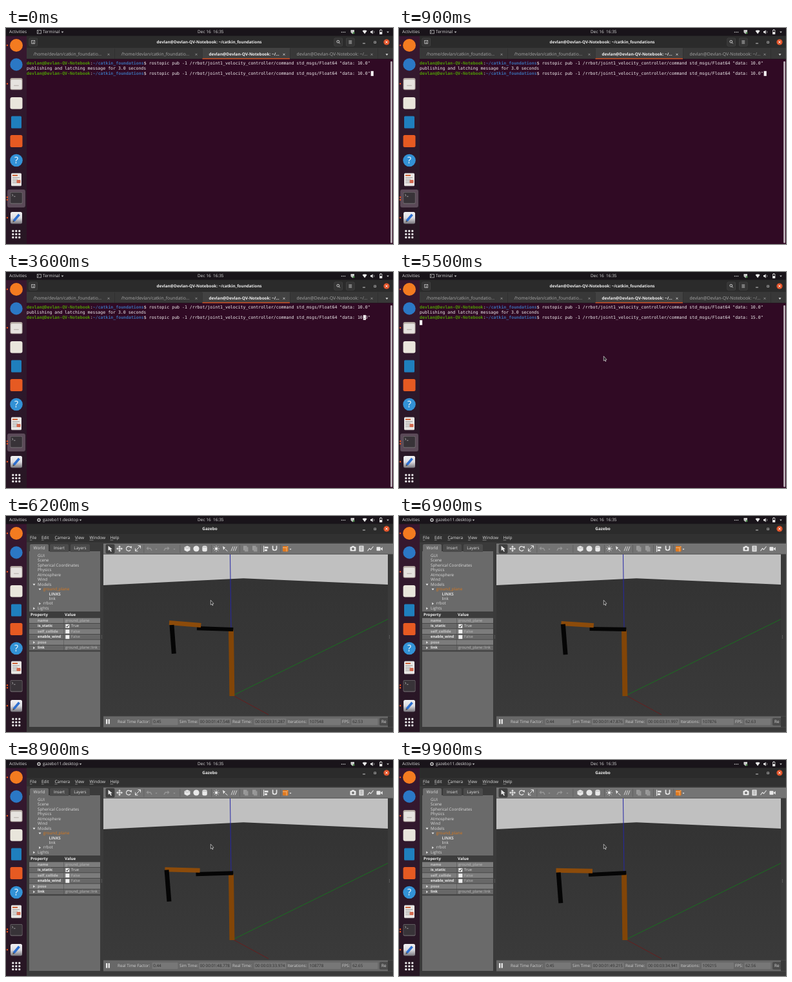
Write an HTML page with a canvas that moves like this. It is 600 px wide and 337 px high and loops after 10 s.

```html
<!DOCTYPE html>
<html lang="en">
<head>
<meta charset="utf-8">
<title>Robot arm velocity command</title>
<style>
html, body { margin: 0; width: 100%; height: 100%; overflow: hidden; background: #000; }
canvas { display: block; }
</style>
</head>
<body>
<canvas id="stage" width="600" height="337"></canvas>
<script>
const c = document.getElementById('stage').getContext('2d');
const UI = '"Open Sans", "Noto Sans", sans-serif';
const MONO = '"DejaVu Sans Mono", monospace';
const CELL = 3.953, LEFT = 32, LINE = 7.95;
const USER = 'devlan', HOST = 'Devlan-QV-Notebook', DIR = '~/catkin_foundations';
c.textRendering = 'geometricPrecision';
c.textBaseline = 'middle';

// ---- drawing helpers ----
function rect(x, y, w, h, fill, r = 0) {
  c.fillStyle = fill;
  c.beginPath();
  c.roundRect(x, y, w, h, r);
  c.fill();
}
function disc(x, y, r, fill) {
  c.fillStyle = fill;
  c.beginPath();
  c.arc(x, y, r, 0, 7);
  c.fill();
}
function ring(x, y, r, color, w = .8, from = 0, to = 6.3) {
  c.strokeStyle = color;
  c.lineWidth = w;
  c.beginPath();
  c.arc(x, y, r, from, to);
  c.stroke();
}
function trace(p) {
  c.beginPath();
  for (let i = 0; i < p.length; i += 2) c.lineTo(p[i], p[i + 1]);
}
function poly(p, fill) {
  trace(p);
  c.fillStyle = fill;
  c.fill();
}
function line(p, color, w = .8) {
  trace(p);
  c.strokeStyle = color;
  c.lineWidth = w;
  c.stroke();
}
function shade(y0, y1, ...colors) {
  const g = c.createLinearGradient(0, y0, 0, y1);
  colors.forEach((color, i) => g.addColorStop(i / (colors.length - 1), color));
  return g;
}
function text(s, x, y, color = '#ddd', size = 6.4, bold = false, align = 'left') {
  c.font = `${bold ? 'bold ' : ''}${size}px ${UI}`;
  c.textAlign = align;
  c.fillStyle = color;
  c.fillText(s, x, y);
}
function arrow(x, y, s, color, right = false) {
  poly(right ? [x - s * .6, y - s, x + s * .7, y, x - s * .6, y + s]
             : [x - s, y - s * .6, x + s, y - s * .6, x, y + s * .7], color);
}

// ---- desktop ----
function topBar(app, gear) {
  rect(0, 0, 600, 12.3, '#19141a');
  text('Activities', 5, 6.3, '#ddd', 6.6);
  if (gear) {
    ring(51, 6.2, 2, '#ccc', 1.4);
  } else {
    c.strokeStyle = '#ccc';
    c.lineWidth = .7;
    c.strokeRect(48.3, 3.4, 6, 5.4);
    line([49.6, 4.8, 51, 6, 49.6, 7.2], '#ccc', .7);
  }
  text(app, 57, 6.3, '#ddd', 6.5);
  arrow(gear ? 115.5 : 87.5, 6.5, 1.8, '#ccc');
  text('Dec 16  16:35', 297, 6.3, '#ddd', 6.5);
  for (const x of [520.5, 523, 525.5]) disc(x, 6.5, .8, '#ccc');
  poly([534.5, 3, 540, 3, 540, 6.5, 537.3, 9.6, 534.5, 6.5], '#ccc');
  disc(539, 7.8, 1.5, '#4c8b4c');
  poly([552.6, 4.6, 554.3, 3.5, 558, 3.5, 559.6, 4.6, 556.1, 9.3], '#eee');
  poly([565, 5, 566.5, 5, 568.6, 3.2, 568.6, 9.4, 566.5, 7.6, 565, 7.6], '#eee');
  ring(568.6, 6.3, 2.2, '#bbb', .7, -1, 1);
  c.strokeStyle = '#ddd';
  c.lineWidth = .7;
  c.strokeRect(579.4, 3.3, 3.6, 6.2);
  rect(579.4, 6.2, 3.6, 3.3, '#eee');
  rect(580.3, 2.2, 1.8, 1, '#eee');
  arrow(592, 6.5, 1.8, '#ccc');
}

function dock(active) {
  rect(0, 12.3, 32, 325, shade(12, 337, '#38182f', '#2d182b', '#271623'));
  if (active) rect(2, 252, 28, 28, '#5b4a58', 3);

  disc(16, 27, 10, '#f47b20');
  disc(16, 57, 9.7, '#2b78c5');
  rect(6.5, 78, 19, 18.5, '#b3a9a2', 2.5);
  rect(7.5, 80.5, 17, 15, '#e6e3df', 2);
  rect(12, 89, 8, 1.5, '#c2bdb8', .8);
  rect(6.5, 108, 19, 18.5, '#e9e6dc', 3);
  rect(8, 137.5, 16, 19, '#1f7fbd', 1.5);
  rect(6.5, 167, 19, 19, '#e65a22', 2.5);
  disc(16, 206.5, 9.8, '#3392d6');
  text('?', 16, 207, '#fff', 14, false, 'center');

  rect(8, 226.5, 16, 20, '#e8e6e4', 1.5);
  rect(10, 229, 8, 2, '#d0653a');
  for (let i = 0; i < 4; i++) rect(10, 233 + i * 2.6, i % 2 ? 8 : 11, .9, '#999');
  rect(16.5, 237, 6, 5, '#d2684e', 1);

  rect(6.5, 256, 19, 18.5, '#6d686b', 2);
  rect(7.2, 256.7, 17.6, 16.6, '#383338', 1.5);
  line([9.3, 259.3, 11, 260.8, 9.3, 262.3], '#ccc', .7);
  line([12, 262.8, 14.5, 262.8], '#ccc', .7);

  rect(7, 287, 18, 18.5, shade(287, 305.5, '#f2f2f4', '#dcdce0', '#77757c'), 2.5);
  line([12, 301, 20.5, 291], '#2d6fd0', 3.6);
  line([11, 302.4, 12.4, 300.7], '#444', 1.8);

  for (let i = 0; i < 9; i++)
    rect(9.3 + i % 3 * 5, 315.3 + (i / 3 | 0) * 5, 3, 3, '#eee', .8);
  for (const y of [27, 87, 264, 268, 296]) disc(2, y, 1.2, '#e95420');
}

function windowButtons(y) {
  line([553, y + 2, 557, y + 2], '#ddd', .9);
  c.strokeStyle = '#bbb';
  c.lineWidth = .8;
  c.strokeRect(570.8, y - 1, 2.7, 2.7);
  disc(590, y, 4.6, '#e2552b');
  line([588.3, y - 1.7, 591.7, y + 1.7], '#fff', .9);
  line([591.7, y - 1.7, 588.3, y + 1.7], '#fff', .9);
}

function pointer() {
  const p = [317.3, 131.3, 317.3, 138.6, 318.9, 137.2, 320, 139.6, 321, 139.1,
             320, 136.9, 322, 136.7, 317.3, 131.3];
  poly(p, '#222');
  line(p, '#ddd', .7);
}

// ---- terminal ----
function mono(s, col, row, color = '#f2f0f1', bold = false) {
  c.font = `${bold ? 'bold ' : ''}${CELL / .602}px ${MONO}`;
  c.textAlign = 'left';
  c.fillStyle = color;
  c.fillText(s, LEFT + col * CELL, 55.7 + row * LINE);
}
function command(row, value) {
  const who = `${USER}@${HOST}`, path = who.length + 1, end = path + DIR.length;
  mono(who, 0, row, '#4e9a06', true);
  mono(':', who.length, row);
  mono(DIR, path, row, '#3a6db0', true);
  mono(`$ rostopic pub -1 /rrbot/joint1_velocity_controller/command std_msgs/Float64 "data: ${value}"`, end, row);
}
function caret(col, row, under = '') {
  rect(LEFT + col * CELL, 51.3 + row * LINE, CELL + .2, LINE - .3, '#f5f3f4');
  mono(under, col, row, '#300a24');
}

function terminal(ms) {
  rect(32, 12, 568, 20, '#2b2b2b');
  rect(32, 31, 568, 17.5, '#383838');
  rect(304, 31, 136, 17.5, '#424242');
  text(`${USER}@${HOST}: ${DIR}`, 315, 22, '#eee', 6.3, true, 'center');
  for (const x of [35.5, 508.5, 527]) {
    rect(x, 15.5, 13.5, 13, '#484848', 2);
    rect(x + .6, 16.1, 12.3, 11.8, '#353535', 1.5);
  }
  c.strokeStyle = '#ddd';
  c.lineWidth = .7;
  c.strokeRect(39.7, 19.5, 5, 4.8);
  line([42.2, 20.8, 42.2, 24.3], '#ddd', .8);
  ring(514.8, 21.2, 1.9, '#ddd', .9);
  line([516.1, 22.6, 517.8, 24.4], '#ddd', 1);
  for (const y of [20, 22, 24]) line([531.4, y, 536.2, y], '#ddd', .8);
  windowButtons(22);

  const session = `${USER}@${HOST}: ~/…`, path = `/home/${USER}/catkin_foundatio…`;
  [path, path, session, session].forEach((label, i) => {
    const x = 32 + i * 136, on = i === 2, color = on ? '#f2f2f2' : '#a6a6a6';
    text(label, x + 10.5, 41.3, color, on ? 6.4 : 6.85, on);
    line([x + 125.5, 39.8, x + 128.5, 42.8], color, .7);
    line([x + 128.5, 39.8, x + 125.5, 42.8], color, .7);
    rect(x + 136, 32, .5, 16, '#282828');
  });
  arrow(590.5, 41.5, 2, '#ddd');

  rect(32, 48.5, 568, 289, '#300a24');
  rect(304.5, 47.2, 135.5, 1.4, '#e95420');
  rect(596.2, 52, 2.6, 283.5, '#c9c1c6', 1);
  command(0, '10.0');
  mono('publishing and latching message for 3.0 seconds', 0, 1);

  command(2, ms < 4300 ? '10.0' : ms < 4600 ? '1.0' : '15.0');
  if (ms < 1800) caret(135, 2);
  else if (ms < 2000) caret(134, 2, '"');
  else if (ms < 2200) caret(133, 2, '0');
  else if (ms < 4300) caret(132, 2, '.');
  else if (ms < 4600) caret(131, 2, '.');
  else if (ms < 5100) caret(132, 2, '.');
  else caret(0, 3);
  if (ms >= 5500) pointer();
}

// ---- simulator ----
// Blends values keyed at 6200, 7800 and 9900 ms.
function keyed(ms, a, b, d) {
  return ms < 7800 ? a + (b - a) * (ms - 6200) / 1600 : b + (d - b) * (ms - 7800) / 2100;
}
function clock(ms) {
  const n = (v, w = 2) => String(Math.floor(v)).padStart(w, '0');
  return `00 00:${n(ms / 60000)}:${n(ms / 1000 % 60)}.${n(ms % 1000, 3)}`;
}

function sidePanel() {
  rect(36, 55, 110, 274, '#6a6a6a');
  [['World', 37, 29], ['Insert', 68, 29], ['Layers', 100, 30]].forEach(([s, x, w], i) => {
    rect(x, 44, w, 12, i ? '#4b4b4b' : '#6a6a6a', [2, 2, 0, 0]);
    text(s, x + w / 2, 50, '#ddd', 6.4, false, 'center');
  });
  const tree = ['GUI', 'Scene', 'Spherical Coordinates', 'Physics', 'Atmosphere', 'Wind',
                'Models', ' ground_plane', '  LINKS', '  link', ' rrbot', 'Lights'];
  tree.forEach((s, i) => {
    const name = s.trim(), depth = s.length - name.length, y = 62.3 + i * 7.45;
    text(name, 49 + depth * 8.7, y, i === 7 ? '#d9781c' : '#dcdcdc', 6.3, i === 8);
    if (i === 6 || i === 7 || i > 9) arrow(43.5 + depth * 9, y, 2, '#eee', i > 9);
  });

  rect(36, 149, 110, 62.5, '#3c3c3c');
  text('Property', 38, 154.7, '#eee', 6.2, true);
  text('Value', 91, 154.7, '#eee', 6.2, true);
  const rows = [['name', 'ground_plane'], ['is_static', 'True'], ['self_collide', 'False'],
                ['enable_wind', 'False'], ['pose', ''], ['link', 'ground_plane::link']];
  rows.forEach(([key, value], i) => {
    const y = 159.3 + i * 8.5, mid = y + 4, box = i > 0 && i < 4;
    rect(36, y, 110, 7.8, i % 2 ? '#686868' : '#7c7c7c');
    rect(89.5, y, .5, 7.8, '#4a4a4a');
    text(key, 49, mid, i % 2 ? '#eee' : '#c8c8c8', 5.8, true);
    text(value, box ? 101 : 92, mid, i === 1 ? '#ddd' : '#bcbcbc', 5.8);
    if (i > 3) arrow(43.5, mid, 2, '#eee', true);
    if (box) rect(92.3, y + .9, 6, 6, '#f0f0f0', .5);
    if (i === 1) line([93.3, mid, 94.8, mid + 1.6, 97.3, mid - 2], '#222', 1);
  });
}

function toolbar() {
  const w = '#e8e8e8', dim = '#969696';
  rect(151, 43, 449, 16.5, '#747474');
  rect(154.5, 44, 14, 14.5, '#404040', 2);
  poly([158.5, 46.5, 158.5, 54, 160.5, 52.6, 162.5, 55.8, 164, 55, 162.2, 52, 164.8, 51.8], w);
  line([172, 51, 180, 51], w, 1.2);
  line([176, 47, 176, 55], w, 1.2);
  for (const d of [-1, 1]) {
    poly([176 + d * 5, 51, 176 + d * 2.6, 49, 176 + d * 2.6, 53], w);
    poly([176, 51 + d * 5, 174, 51 + d * 2.6, 178, 51 + d * 2.6], w);
  }
  ring(190, 51, 3.5, w, 1.2, .5, 5.6);
  poly([191.5, 48, 195, 47, 194.5, 51], w);
  line([201, 54, 208, 47], w, 1);
  line([204.5, 46.5, 208.5, 46.5, 208.5, 50.5], w, 1);
  line([200.5, 50.5, 200.5, 54.8, 204.5, 54.8], w, 1);
  for (const x of [213.5, 269.5, 318, 362, 394, 425.5]) rect(x, 45, .7, 12.5, '#5a5a5a');

  for (const [x, d] of [[222, -1], [249, 1]]) {
    line([x - d * 4, 54, x - d * 2, 50.5, x + d * 2, 50.5], dim, 1.5);
    poly([x + d * 4.5, 50.5, x + d * 1.5, 47.5, x + d * 1.5, 53.5], dim);
  }
  for (const x of [233, 261]) arrow(x, 52, 1.5, dim);
  poly([276.5, 48.5, 281, 46.5, 285.5, 48.5, 285.5, 53.5, 281, 55.8, 276.5, 53.5], w);
  line([276.5, 48.5, 281, 50.5, 285.5, 48.5], '#999', .6);
  disc(295, 51, 4.6, w);
  rect(304.3, 46.5, 7.5, 9, w, 2.5);
  line([304.5, 48.7, 311.6, 48.7], '#999', .6);
  for (let i = 0; i < 8; i++) {
    const a = i * Math.PI / 4, x = Math.cos(a), y = Math.sin(a);
    line([326 + x * 3, 51 + y * 3, 326 + x * 4.8, 51 + y * 4.8], w, .8);
  }
  disc(326, 51, 2.2, w);
  poly([336, 47, 340, 49.5, 337, 53], w);
  line([340, 52, 343.5, 55], w, 1);
  for (let i = 0; i < 3; i++) line([349 + i * 3, 54.5, 352 + i * 3, 47.5], w, .9);
  for (const x of [368, 382]) {
    rect(x, 46.5, 5.5, 7, '#9b9b9b');
    rect(x + 2, 48.5, 5.5, 7, dim);
  }
  rect(399, 46.5, 1.2, 9.5, w);
  rect(401, 47.8, 5.5, 2.8, w);
  rect(401, 52, 4, 2.8, w);
  ring(416.5, 50.5, 3, w, 1.7, 0, Math.PI);
  rect(412.7, 46.5, 1.7, 4.2, w);
  rect(418.7, 46.5, 1.7, 4.2, w);
  rect(429, 47, 8.5, 8.5, '#e07a20', 1);
  line([429, 49.5, 435, 49.5, 437.5, 47], '#f3cda5', .7);
  line([435, 49.5, 435, 55.5], '#f3cda5', .7);
  arrow(441, 52, 1.5, w);

  rect(533.5, 48, 9, 6.8, w, 1);
  rect(536, 46.8, 4, 2, w);
  disc(538, 51.3, 2, '#747474');
  rect(547.5, 46.5, 7, 9, w);
  for (let i = 0; i < 3; i++) rect(549, 48.2 + i * 2.2, 4, .8, '#777');
  line([560.5, 54.5, 563.5, 50.5, 565.5, 52.5, 569.5, 47.5], w, 1.1);
  rect(574.5, 48.2, 6, 6, w, 1);
  poly([580.5, 51.2, 583.8, 48.5, 583.8, 54], w);
}

function scene(ms) {
  const k = (...v) => keyed(ms, ...v);
  c.save();
  c.beginPath();
  c.rect(151, 60, 441, 252);
  c.clip();
  rect(151, 60, 441, 252, '#c0c0c0');
  poly([151, 108, 368, 97.2, 592, 107, 592, 312, 151, 312], shade(97, 312, '#333', '#3a3a3a'));
  line([352, 280, 592, 161], '#16761c', .9);
  line([352, 280, 407, 310], '#6e1a1a', .9);
  line([347.5, 60, 349, 178], '#2526a5', 1);

  line([349, 177.5, 350.4, 281], '#824507', 8);
  line([k(296, 295, 294), k(175.2, 177, 179), 352.3, k(177, 176.7, 176.2)], '#050505', 6.2);
  line([k(253, 249.5, 243.5), k(166.5, 168.8, 172.3), k(302.3, 301.3, 300), k(170.5, 171.3, 173.2)], '#8c4b0a', 7);
  line([k(257, 251, 247.2), k(170, 167, 175.5), k(260.3, 255.3, 250.8), k(214.8, 218, 223.3)], '#050505', 7);
  c.restore();
}

function statusBar(ms) {
  const k = (...v) => keyed(ms, ...v), sim = Math.round(k(107548, 108298, 109215));
  rect(151, 312.5, 449, 17, '#686868');
  rect(155, 317, 2.2, 7.5, '#eee');
  rect(158.6, 317, 2.2, 7.5, '#eee');
  const items = [
    ['Real Time Factor:', 173, 226.5, 40, k(.45, .42, .45).toFixed(2)],
    ['Sim Time:', 269, 299, 50, clock(sim)],
    ['Real Time:', 351, 384.5, 50, clock(k(211287, 212912, 214941))],
    ['Iterations:', 436.5, 469, 50, sim],
    ['FPS:', 521, 535.5, 41, k(62.53, 62.75, 62.56).toFixed(2)]
  ];
  for (const [label, x, box, w, value] of items) {
    rect(box, 316, w, 10, '#777', 1);
    text(label, x, 321, '#d2d2d2', 6.3);
    text(value, box + 1.7, 321, '#2d2d2d', 6.3);
  }
  rect(579, 315, 13, 12, '#4c4c4c', [2, 0, 0, 2]);
  text('Re', 582, 321, '#ddd', 6.4);
  rect(592, 312.5, 8, 17, '#3a3a3a');
}

function simulator(ms) {
  rect(32, 12, 568, 325, '#3a3a3a');
  rect(32, 12, 568, 16, '#2b2b2b');
  text('Gazebo', 316, 20, '#eee', 6.4, true, 'center');
  windowButtons(20);
  rect(32, 28, 568, 13, '#313131');
  [['File', 37], ['Edit', 55], ['Camera', 75.5], ['View', 107], ['Window', 129.5], ['Help', 161.5]]
    .forEach(([s, x]) => {
      text(s, x, 34, '#e0e0e0', 6.5);
      rect(x, 37.6, c.measureText(s[0]).width, .5, '#ccc');
    });
  sidePanel();
  toolbar();
  scene(ms);
  statusBar(ms);
  for (let i = 0; i < 3; i++) {
    disc(148.3, 186.5 + i * 2, .5, '#888');
    disc(594.5, 186.5 + i * 2, .5, '#888');
  }
  pointer();
}

function frame() {
  const ms = Math.floor(performance.now() % 10000 / 100) * 100, robot = ms >= 6200;
  c.clearRect(0, 0, 600, 337);
  if (robot) simulator(ms);
  else terminal(ms);
  dock(!robot);
  topBar(robot ? 'gazebo11.desktop' : 'Terminal', robot);
  requestAnimationFrame(frame);
}
frame();
</script>
</body>
</html>
```
